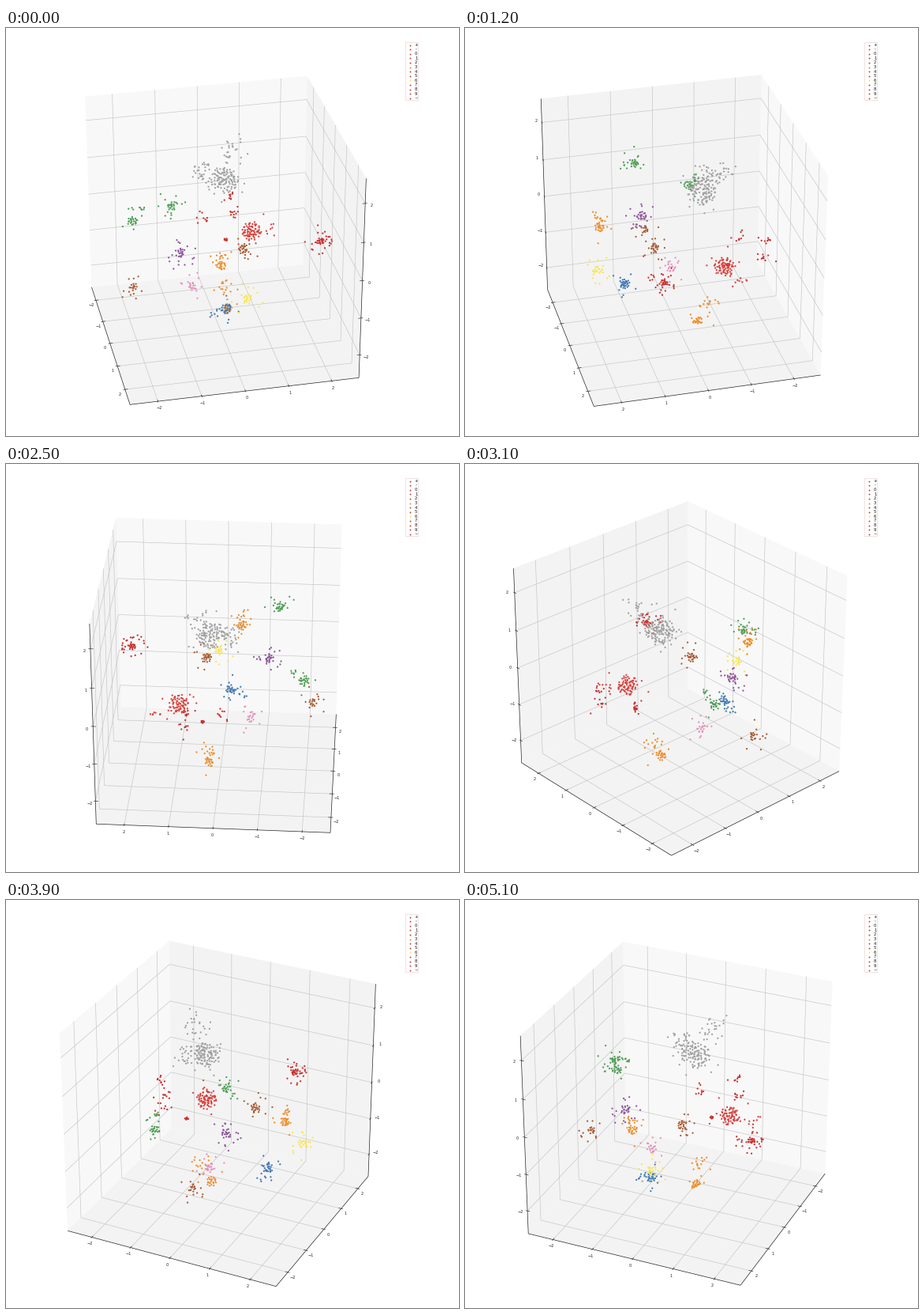
A matplotlib script that plays this animation: 574 px wide and 516 px high, repeating every 5200 ms.

```python
import numpy as np
import matplotlib.pyplot as plt
from matplotlib.animation import FuncAnimation
from matplotlib.collections import LineCollection
from matplotlib.patches import Polygon, Rectangle

W, H = 574, 516
FRAMES, INTERVAL = 52, 100
CENTER = np.array([272.3, 263.0])
SCALE = np.array([292.0, -284.5])
ELEV = np.radians(30)
DIST = 10
START, STEP = -12.1, 4          # degrees
UNIT = 0.19                     # one axis unit, in box widths
TICKS = np.arange(-2, 3)

GREY, RED, CRIMSON = "#a0a0a0", "#da3f3b", "#c9302e"
ORANGE, BLUE, YELLOW = "#ee8c28", "#3f78b2", "#f8e650"
PINK, GREEN, PURPLE, BROWN = "#e291bc", "#4f9d55", "#8f559c", "#a85a33"

# color, center x, y, z, core radius, core points, halo points
CLUSTERS = [
    (GREY, -.084, .038, .236, .062, 105, 14),
    (RED, -.155, .178, -.082, .048, 74, 4),
    (CRIMSON, .172, .407, .023, .019, 19, 24),
    (CRIMSON, -.200, .064, -.141, .008, 8, 0),
    (ORANGE, .341, -.072, .054, .022, 22, 6),
    (ORANGE, -.070, .045, -.430, .022, 22, 4),
    (BLUE, .240, -.029, -.230, .023, 24, 7),
    (YELLOW, .377, .041, -.105, .022, 16, 12),
    (PINK, .012, -.131, -.233, .025, 16, 8),
    (GREEN, -.132, -.366, .042, .023, 22, 5),
    (GREEN, .147, -.239, .262, .022, 20, 12),
    (PURPLE, .124, -.205, .011, .023, 20, 15),
    (BROWN, .060, -.399, -.177, .019, 13, 10),
    (BROWN, .134, .073, -.005, .023, 23, 9),
]
# color, center x, y, z, spread, points
LOOSE = [
    (GREY, -.142, -.047, .255, .027, 22),
    (GREY, -.154, .085, .325, .028, 26),
    (CRIMSON, -.353, .117, .000, .018, 9),
    (CRIMSON, -.336, .130, -.081, .017, 10),
    (CRIMSON, -.277, -.020, -.060, .018, 9),
    (RED, -.203, .265, -.115, .014, 8),
    (ORANGE, .341, -.070, .104, .024, 11),
    (ORANGE, -.121, .045, -.350, .022, 15),
    (BLUE, .243, -.080, -.250, .013, 7),
    (GREEN, -.152, -.322, .090, .012, 7),
]


def directions(rng, n):
    d = rng.normal(size=(n, 3))
    return d / np.linalg.norm(d, axis=1, keepdims=True)


def spaced_ball(rng, n, radius):
    """Points in a ball, pushed apart so that they do not clump."""
    p = directions(rng, n) * rng.random((n, 1)) ** (1 / 3)
    for _ in range(12):
        gap = p[:, None] - p[None]
        dist = np.linalg.norm(gap, axis=2, keepdims=True) + 1e-6
        p += 0.12 * (gap / dist * np.clip(1.5 / n ** (1 / 3) - dist, 0, None)).sum(1)
        p /= np.maximum(1, np.linalg.norm(p, axis=1, keepdims=True))
    return p * radius


def make_cloud():
    rng = np.random.default_rng(7)
    points, colors = [], []

    def add(color, center, offsets):
        points.append(np.array(center) + offsets)
        colors.extend([color] * len(offsets))

    for color, x, y, z, radius, n, halo in CLUSTERS:
        add(color, (x, y, z), spaced_ball(rng, n, radius))
        reach = radius + rng.uniform(.02, .055, (halo, 1))
        add(color, (x, y, z), directions(rng, halo) * reach)
    for color, x, y, z, spread, n in LOOSE:
        add(color, (x, y, z), rng.normal(0, spread, (n, 3)))
    return np.vstack(points), np.array(colors)


def project(p, az):
    """Box coordinates to stage pixels, plus the depth towards the viewer."""
    x, y, z = np.moveaxis(np.asarray(p, float), -1, 0)
    side = y * np.cos(az) - x * np.sin(az)
    near = x * np.cos(az) + y * np.sin(az)
    up = z * np.cos(ELEV) - near * np.sin(ELEV)
    depth = near * np.cos(ELEV) + z * np.sin(ELEV)
    flat = np.stack([side, up], -1) / (1 - depth / DIST)[..., None]
    return CENTER + flat * SCALE, depth


def azimuth(i):
    turns = np.interp(i, [0, 3, 4, 12, 18, 25, 31, 39, 51],
                      [0, 6, 6, 22, 35, 49, 60, 77, 99])
    return np.radians(START + STEP * np.rint(turns))


def along(axis, base, value):
    p = np.array(base, float)
    p[axis] = value
    return p


def box_parts(az):
    """Walls, grid, axis lines, ticks and label anchors seen from az."""
    cx, sy = np.copysign(.5, np.cos(az)), np.copysign(.5, np.sin(az))
    back = np.array([-cx, -sy, -.5])
    walls, grid, axes, ticks, labels = [], [], [], [], []
    for k in range(3):
        a, b = [j for j in range(3) if j != k]
        wall = []
        for s, t in ((-.5, -.5), (.5, -.5), (.5, .5), (-.5, .5)):
            wall.append(along(b, along(a, back, s), t))
        walls.append(wall)
        for value in TICKS * UNIT:
            spot = along(k, back, value)
            grid += [[along(j, spot, -.5), along(j, spot, .5)] for j in (a, b)]

    edges = [(0, sy, -.5), (cx, 0, -.5), (cx, -sy, 0)]
    for k, (base, side) in enumerate(zip(edges, (1, 0, 1))):
        base = np.array(base)
        axes.append([along(k, base, -.5), along(k, base, .5)])
        out = along(side, np.zeros(3), np.sign(base[side]))
        for value in TICKS * UNIT:
            spot = along(k, base, value)
            ticks.append([spot - .012 * out, spot + .008 * out])
            labels.append(spot + .022 * np.sign(base))
    return walls, grid, axes, ticks, labels


def draw_legend(ax):
    ax.add_patch(Rectangle((506, 18), 16, 73, fc="white", ec="#ecd3d3", lw=.5))
    names = ["+", "-"] + [str(n) for n in range(10)] + ["~"]
    for row, name in enumerate(names):
        y = 21.5 + 5.6 * row
        color = {5: "#e8803a", 8: YELLOW}.get(row, "#c04442")
        ax.plot(511.7, y, "o", ms=1.4, mew=0, color=color)
        ax.text(519.7, y, name, fontsize=3.8, ha="center", va="center", color="#111111")


fig = plt.figure(figsize=(W / 100, H / 100), dpi=100, facecolor="white")
ax = fig.add_axes([0, 0, 1, 1])
ax.set(xlim=(0, W), ylim=(H, 0))
ax.axis("off")

cloud, cloud_colors = make_cloud()
wall_art = [ax.add_patch(Polygon(np.zeros((4, 2)), fc=c, lw=0, zorder=1))
            for c in ("#f8f8f8", "#f3f3f3", "#f3f3f3")]
grid_art = ax.add_collection(LineCollection([], colors="#c4c4c4", lw=.45, zorder=2))
axis_art = ax.add_collection(LineCollection([], colors="#222222", lw=.5, zorder=3))
tick_art = ax.add_collection(LineCollection([], colors="#222222", lw=.45, zorder=3))
dots = ax.scatter(cloud[:, 0], cloud[:, 1], s=2.6, lw=0, zorder=4)
label_art = [ax.text(0, 0, str(t).replace("-", "\u2212"), fontsize=3.6,
                     ha="center", va="center", color="#222222", zorder=5)
             for _ in range(3) for t in TICKS]
draw_legend(ax)


def draw(i):
    az = azimuth(i)
    walls, grid, axes, ticks, labels = box_parts(az)
    for art, xy in zip(wall_art, project(walls, az)[0]):
        art.set_xy(xy)
    for art, lines in ((grid_art, grid), (axis_art, axes), (tick_art, ticks)):
        art.set_segments(project(lines, az)[0])
    for art, xy in zip(label_art, project(labels, az)[0]):
        art.set_position(xy)
    xy, depth = project(cloud, az)
    order = np.argsort(depth)
    dots.set_offsets(xy[order])
    dots.set_facecolors(cloud_colors[order])
    return []


anim = FuncAnimation(fig, draw, frames=FRAMES, interval=INTERVAL,
                     init_func=lambda: draw(0), repeat=True, repeat_delay=0)
plt.show()
```
